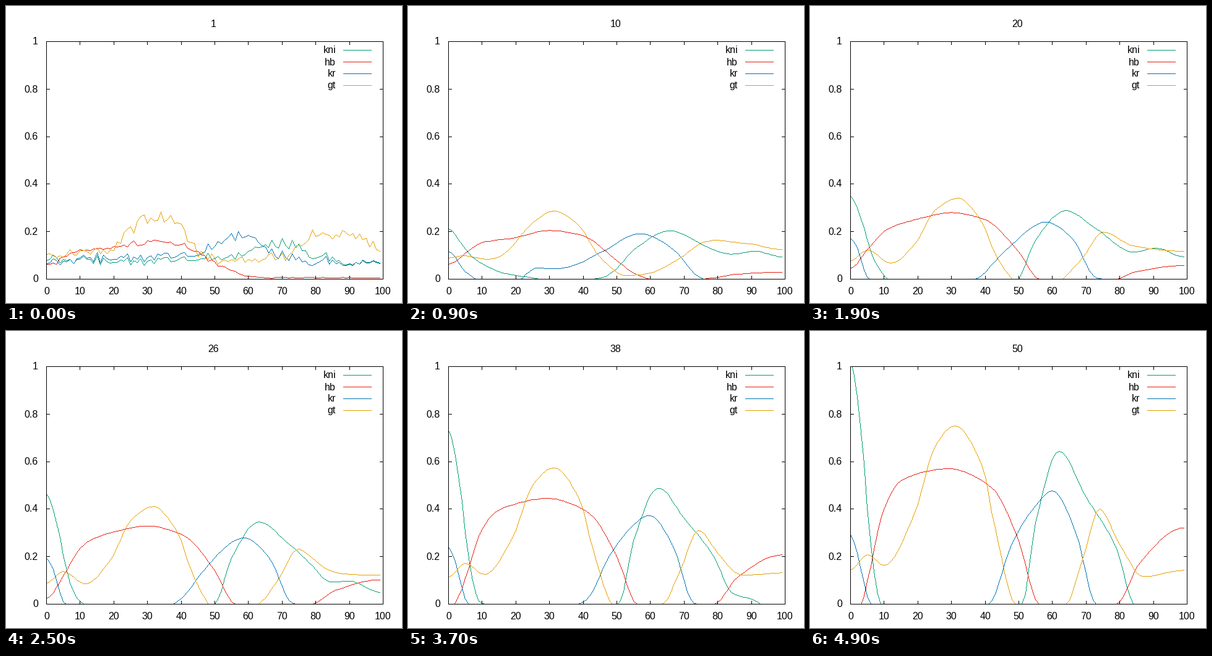
Write a matplotlib script that moves like this. It is 640 by 480 pixels and loops after 5 s.

```python
import numpy as np
import matplotlib
import matplotlib.pyplot as plt
from matplotlib.animation import FuncAnimation

matplotlib.rcParams["font.family"] = "Liberation Sans"
W, H, DPI = 640, 480, 100
LEFT, RIGHT, TOP, BOTTOM = 65, 609, 57, 441
FRAMES = 50
POS = np.arange(100)
BLACK = (0, 0, 0)


def curve(points):
    """Smooth monotone cubic through a few points, sampled at POS."""
    x, y = np.array(points, float).T
    h, s = np.diff(x), np.diff(y) / np.diff(x)
    w1, w2 = 2 * h[1:] + h[:-1], h[1:] + 2 * h[:-1]
    rising = s[:-1] * s[1:] > 0
    den = np.where(rising, w1 * s[1:] + w2 * s[:-1], 1)
    d = np.zeros_like(y)
    d[1:-1] = np.where(rising, (w1 + w2) * s[:-1] * s[1:] / den, 0)
    i = np.clip(np.searchsorted(x, POS, side="right") - 1, 0, len(h) - 1)
    t = (POS - x[i]) / h[i]
    u = 1 - t
    return (u * u * ((1 + 2 * t) * y[i] + t * h[i] * d[i])
            + t * t * ((1 + 2 * u) * y[i + 1] - u * h[i] * d[i + 1]))


class Gene:
    """Concentration along the axis, shaped by key points at a few generations."""

    def __init__(self, name, color, roughness, seed, keys):
        self.name, self.color = name, color
        self.times = list(keys)
        self.shapes = [curve(points) for points in keys.values()]
        grain = np.random.default_rng(seed).normal(0, roughness, len(POS))
        self.noise = grain * np.sqrt(self.shapes[0] / 0.1)

    def at(self, gen):
        k = min(np.searchsorted(self.times, gen, side="right"), len(self.times) - 1)
        t0, t1 = self.times[k - 1], self.times[k]
        ease = ((gen - t0) / (t1 - t0)) ** 1.1
        base = self.shapes[k - 1] * (1 - ease) + self.shapes[k] * ease
        return base + self.noise * 0.3 ** (gen - 1)


# Values below zero are hidden; they set where a curve leaves the axis.
genes = [
    Gene("kni", (0, 158, 115), 0.011, 4, {
        1: [(0, .085), (20, .077), (50, .09), (58, .1), (67, .148), (74, .138), (82, .09),
            (99, .065)],
        6: [(0, .165), (5, .113), (12, .072), (21, .035), (37, .003), (45, .023), (56, .117),
            (67, .178), (77, .123), (84, .102), (91, .114), (99, .094)],
        20: [(0, .35), (3, .26), (7, .08), (11, 0), (16, -.05), (46, -.05), (50, 0),
             (55, .165), (64, .288), (73, .212), (84, .114), (91, .13), (99, .094)],
        50: [(0, 1.02), (3, .75), (6, .25), (9, 0), (30, -.02), (51, 0), (55, .345),
             (62, .644), (70, .45), (79, .235), (84, 0), (90, -.06), (99, -.16)]}),
    Gene("hb", (229, 30, 16), 0.005, 2, {
        1: [(0, .063), (10, .12), (20, .133), (32, .158), (41, .14), (50, .068), (60, .013),
            (65, .007), (99, .006)],
        6: [(0, .07), (10, .139), (18, .145), (30, .179), (40, .16), (50, .067), (61, 0),
            (67, -.01), (74, 0), (84, .015), (99, .02)],
        20: [(0, .045), (5, .125), (11, .21), (20, .253), (30, .28), (40, .25), (50, .115),
             (56, 0), (67, -.02), (79, 0), (85, .032), (99, .057)],
        50: [(0, -.08), (3, -.01), (6, .16), (9, .36), (15, .52), (29, .57), (42, .49),
             (50, .265), (56, 0), (67, -.02), (79, 0), (86, .175), (99, .321)]}),
    Gene("kr", (0, 114, 178), 0.011, 4, {
        1: [(0, .07), (10, .085), (30, .095), (45, .107), (56, .182), (60, .172), (69, .1),
            (80, .075), (99, .068)],
        6: [(0, .097), (4, .05), (9, 0), (14, -.02), (20, 0), (26, .072), (31, .063),
            (45, .112), (56, .175), (68, .105), (76, 0), (99, -.03)],
        20: [(0, .173), (2, .133), (5, .007), (18, -.05), (29, -.02), (37, 0), (46, .12),
             (58, .24), (66, .17), (73, .005), (99, -.03)],
        50: [(0, .292), (2, .215), (4, .09), (6, 0), (24, -.03), (41, 0), (48, .255),
             (54, .395), (60, .477), (67, .3), (73, 0), (99, -.03)]}),
    Gene("gt", (230, 159, 0), 0.013, 7, {
        1: [(0, .103), (15, .122), (20, .15), (29, .268), (39, .24), (45, .115), (52, .075),
            (72, .108), (81, .19), (90, .182), (99, .15)],
        6: [(0, .094), (9, .087), (15, .097), (24, .208), (31, .268), (39, .215), (45, .105),
            (53, .036), (62, .053), (70, .097), (81, .164), (90, .154), (99, .126)],
        20: [(0, .077), (5, .123), (12, .067), (19, .145), (25, .288), (32, .341), (38, .263),
             (44, .08), (48, 0), (51, -.045), (60, -.04), (63, 0), (69, .09), (75, .198),
             (84, .14), (99, .118)],
        50: [(0, .143), (5, .208), (10, .163), (19, .38), (25, .66), (31, .751), (39, .585),
             (43, .32), (49, 0), (56, -.02), (64, 0), (69, .19), (74, .4), (80, .25),
             (87, .116), (99, .142)]}),
]


def to_x(v):
    return np.rint(LEFT + (RIGHT - LEFT) * v / 100).astype(int)


def to_y(v):
    return np.rint(BOTTOM - (BOTTOM - TOP) * v).astype(int)


def stroke(canvas, xs, ys, color=BLACK):
    """Hard-edged polyline, one pixel wide, kept inside the plot box."""
    for x0, y0, x1, y1 in zip(xs[:-1], ys[:-1], xs[1:], ys[1:]):
        n = max(abs(x1 - x0), abs(y1 - y0)) + 1
        cols = np.rint(np.linspace(x0, x1, n)).astype(int)
        rows = np.rint(np.linspace(y0, y1, n)).astype(int)
        inside = (rows >= TOP) & (rows <= BOTTOM)
        canvas[rows[inside], cols[inside]] = color


def label(x, y, text, ha="center"):
    return ax.text(x, y, text, ha=ha, va="baseline", fontsize=16 * 72 / DPI)


def draw_frame(canvas):
    stroke(canvas, [LEFT, RIGHT, RIGHT, LEFT, LEFT], [TOP, TOP, BOTTOM, BOTTOM, TOP])
    for v in range(10, 100, 10):
        x = to_x(v)
        stroke(canvas, [x, x], [TOP, TOP + 5])
        stroke(canvas, [x, x], [BOTTOM, BOTTOM - 5])
    for v in np.arange(1, 5) / 5:
        y = to_y(v)
        stroke(canvas, [LEFT, LEFT + 5], [y, y])
        stroke(canvas, [RIGHT, RIGHT - 5], [y, y])


def render(gen):
    canvas = np.full((H, W, 3), 255, np.uint8)
    for row, gene in enumerate(genes):
        y = 71 + 19 * row
        stroke(canvas, [545, 590], [y, y], gene.color)
        stroke(canvas, to_x(POS), to_y(gene.at(gen)), gene.color)
    draw_frame(canvas)
    return canvas


fig = plt.figure(figsize=(W / DPI, H / DPI), dpi=DPI, facecolor="white")
ax = fig.add_axes([0, 0, 1, 1])
ax.axis("off")
picture = ax.imshow(render(1), extent=(0, W, H, 0), aspect="auto", interpolation="nearest")

title = label(335.5, 33.5, "1")
for v in range(0, 101, 10):
    label(to_x(v) + 0.5, 466, str(v))
for v in np.arange(6) / 5:
    label(52, to_y(v) + 5.5, f"{v:g}", "right")
for row, gene in enumerate(genes):
    label(533, 76.5 + 19 * row, gene.name, "right")


def update(i):
    title.set_text(str(i + 1))
    picture.set_data(render(i + 1))
    return [title, picture]


anim = FuncAnimation(fig, update, frames=FRAMES, interval=100, repeat=True, blit=False)
plt.show()
```
